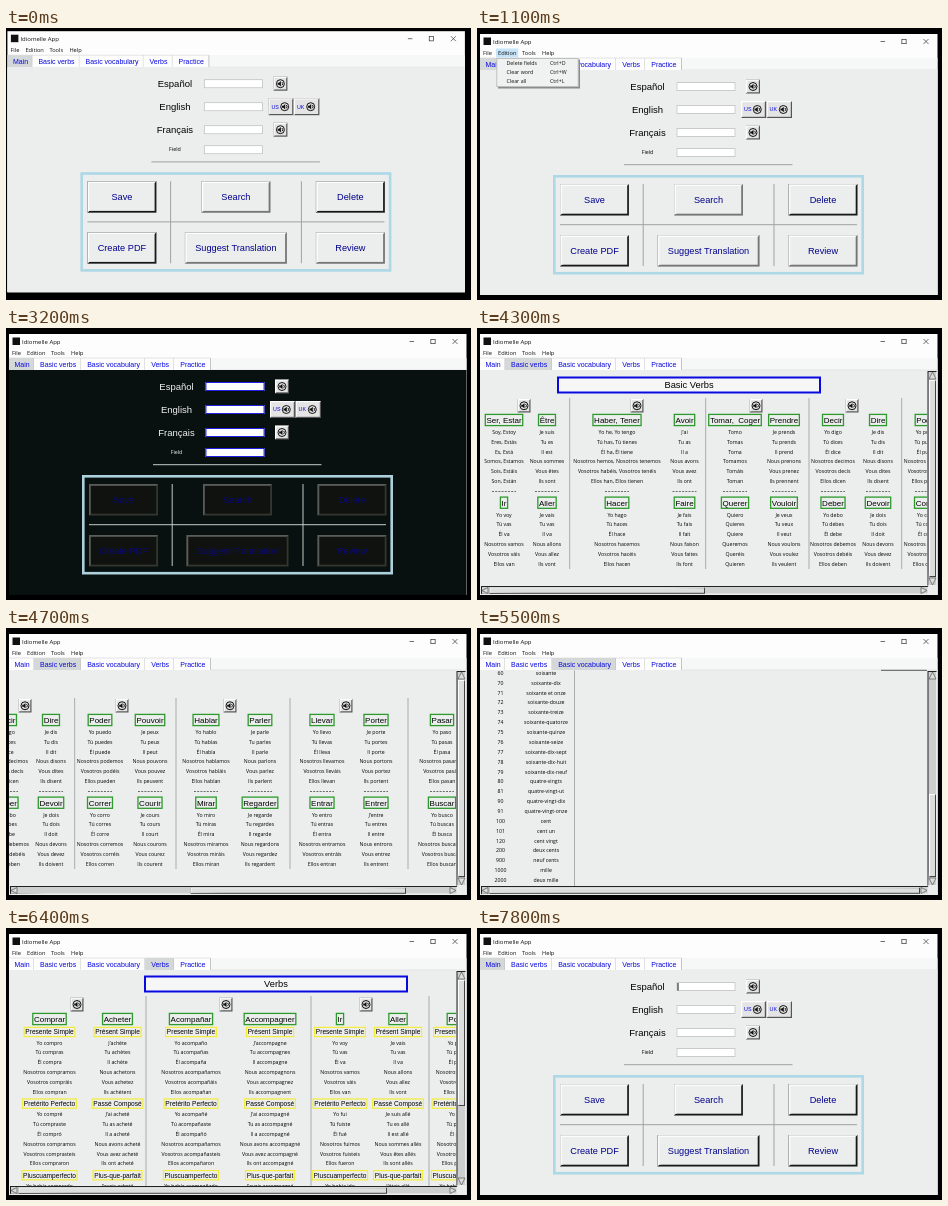
These frames come from a looping animation (465x272 px, 8000 ms). An HTML page with a canvas:

```html
<!DOCTYPE html>
<html lang="en">
<head>
<meta charset="utf-8">
<title>Idiomelle App</title>
<style>
html, body { margin: 0; width: 100%; height: 100%; overflow: hidden; background: #000; }
canvas { display: block; width: 465px; height: 272px; }
</style>
</head>
<body>
<canvas id="stage"></canvas>
<script>
const LOOP = 8000, W = 465, H = 272;
const canvas = document.getElementById('stage');
const c = canvas.getContext('2d');
const dpr = window.devicePixelRatio || 1;
canvas.width = W * dpr;
canvas.height = H * dpr;

const ARIAL = '"Liberation Sans", Arial, sans-serif';
const UI = '"Open Sans", "Noto Sans", sans-serif';
const PAGE = '#eceeed', BLUE = '#0808e0', NAVY = '#00008b';
const clamp = v => Math.max(0, Math.min(1, v));

// ---- drawing helpers ----
function rect(x, y, w, h, color) { c.fillStyle = color; c.fillRect(x, y, w, h); }
function frame(x, y, w, h, color, d = 1) {
  c.strokeStyle = color; c.lineWidth = d;
  c.strokeRect(x + d / 2, y + d / 2, w - d, h - d);
}
function line(x1, y1, x2, y2, color, d = 1) {
  c.strokeStyle = color; c.lineWidth = d;
  c.beginPath(); c.moveTo(x1, y1); c.lineTo(x2, y2); c.stroke();
}
function poly(color, ...p) {
  c.fillStyle = color; c.beginPath();
  for (let i = 0; i < p.length; i += 2) c.lineTo(p[i], p[i + 1]);
  c.fill();
}
function text(s, x, y, size, color = '#000', align = 'center', font = ARIAL) {
  c.font = size + 'px ' + font;
  c.textAlign = align;
  c.fillStyle = color;
  c.fillText(s, x, y + size * 0.35);
}
function bevel(x, y, w, h, d, fill, hi, lo) {
  rect(x, y, w, h, lo);
  poly(hi, x, y, x + w, y, x + w - d, y + d, x + d, y + h - d, x, y + h);
  rect(x + d, y + d, w - 2 * d, h - 2 * d, fill);
}
function boxed(s, x, y, size, h, color, d) {
  c.font = size + 'px ' + ARIAL;
  const w = c.measureText(s).width + 3.6;
  frame(x - w / 2, y - h / 2, w, h, color, d);
  text(s, x, y, size);
}
function speaker(x, y) {
  c.strokeStyle = '#111'; c.lineWidth = 1;
  c.beginPath(); c.arc(x, y, 4, 0, 7); c.stroke();
  poly('#111', x - 2.8, y - 1, x - 1.4, y - 1, x + .5, y - 2.7, x + .5, y + 2.7, x - 1.4, y + 1, x - 2.8, y + 1);
  c.beginPath(); c.arc(x + .3, y, 2, -.9, .9); c.stroke();
}
function soundButton(x, y, w = 14, h = 14, label = '') {
  bevel(x, y, w, h, 1.2, '#e4e4e4', '#fff', '#555');
  speaker(x + w - (label ? 8.7 : w / 2), y + h / 2);
  if (label) text(label, x + 6.8, y + h / 2, 5.3, BLUE);
}
function heading(s, x, y) {
  rect(x, y, 264, 17, '#f5f6f5');
  frame(x, y, 264, 17, BLUE, 2);
  text(s, x + 132, y + 8.5, 9.3);
}

// ---- window ----
const tabs = [['Main', 3, 25], ['Basic verbs', 28, 47], ['Basic vocabulary', 75, 64], ['Verbs', 139, 29], ['Practice', 168, 36.5]];
const menus = [
  { name: 'File', x: 6, left: 4, w: 66, h: 33, key: 44, items: [['Open Sheet', 'Ctrl+E'], ['Open PDF', 'Ctrl+P'], null, ['Exit']] },
  { name: 'Edition', x: 21, left: 19.5, w: 82, h: 29, key: 73, items: [['Delete fields', 'Ctrl+D'], ['Clear word', 'Ctrl+W'], ['Clear all', 'Ctrl+L']] },
  { name: 'Tools', x: 45, left: 43, w: 87, h: 29, key: 102, items: [['Change theme', 'Ctrl+T'], ['Change voice', 'Ctrl+O'], ['Font size', 'Ctrl+F']] },
  { name: 'Help', x: 65, left: 63, w: 64, h: 20, key: 103, items: [['User guide', 'Ctrl+H'], ['About']] }
];

function chrome(tab, page, open) {
  rect(3, 6, 457.5, 261, '#fdfdfd');
  rect(204.5, 30, 256, 12, '#f6f7f7');
  rect(3, 42, 457.5, 225, page);
  rect(6.5, 9.5, 7.5, 7.5, '#111');
  text('Idiomelle App', 16, 13.5, 6, '#111', 'left', UI);
  line(403.5, 13.5, 408, 13.5, '#333', .7);
  frame(424.5, 11, 5, 5, '#333', .7);
  line(446.5, 11, 451.5, 16, '#333', .7);
  line(451.5, 11, 446.5, 16, '#333', .7);
  menus.forEach((m, i) => {
    if (i === open) rect(m.x - 2, 20.5, m.name.length * 2.6 + 4, 9, '#c5e4fa');
    text(m.name, m.x, 25, 5.7, '#111', 'left', UI);
  });
  tabs.forEach(([name, x, w], i) => {
    rect(x, 30, w, 12, i === tab ? '#d5d8d9' : '#fdfdfd');
    line(x + w, 30, x + w, 42, '#b4b8b8', .8);
    text(name, x + w / 2 + .6, 36.3, 7, BLUE);
  });
  line(3, 30, 204.5, 30, '#d0d2d2', .6);
  line(204.5, 42, 460.5, 42, '#d8dada', .6);
}

function dropDown({ left, w, h, key, items }) {
  rect(left + 1.5, 31.5, w, h, '#8a8c8c');
  rect(left, 30, w, h, '#f0f1f1');
  frame(left, 30, w, h, '#aaa', .7);
  let y = 35.5;
  for (const item of items) {
    if (!item) {
      line(left + 3, y - 2.8, left + w - 3, y - 2.8, '#aaa', .6);
      y += 3.5;
      continue;
    }
    text(item[0], left + 10, y, 5.3, '#111', 'left', UI);
    if (item[1]) text(item[1], key, y, 5.3, '#111', 'left', UI);
    y += 9;
  }
}

// h0..h1 and v0..v1 are the ends of the two thumbs
function scrollBars(h0, h1, v0, v1) {
  rect(450.5, 42, 10, 225, PAGE);
  rect(3, 258, 457.5, 9, PAGE);
  bevel(450.5, 43, 9.5, 215, 1, '#cdcfce', '#222', '#eee');
  bevel(4, 258, 447.5, 8.5, 1, '#cdcfce', '#222', '#eee');
  bevel(452, v0, 7, v1 - v0, .9, '#dcdedd', '#fff', '#333');
  bevel(h0, 259.3, h1 - h0, 6.4, .9, '#dcdedd', '#fff', '#333');
  const arrow = (...p) => {
    poly('#dcdedd', ...p);
    c.closePath(); c.strokeStyle = '#555'; c.lineWidth = .7; c.stroke();
  };
  arrow(455.5, 44, 459, 51, 452, 51);
  arrow(452, 250, 459, 250, 455.5, 257);
  arrow(5, 262.5, 11, 259.5, 11, 265.5);
  arrow(450, 262.5, 444, 259.5, 444, 265.5);
}

function clipPage(draw, dx = 0, dy = 0) {
  c.save();
  c.beginPath(); c.rect(3, 42.5, 447.5, 215.5); c.clip();
  c.translate(-dx, -dy);
  draw();
  c.restore();
}

// ---- main page ----
const themes = {
  light: { page: PAGE, ink: '#000', rule: '#a0a2a2', edge: '#add8e6', entry: '#c4c6c6', face: '#eceeed', hi: '#fff', label: NAVY },
  mild: { page: '#e2efe0', ink: '#000', rule: '#a0a2a2', edge: '#b9dfba', entry: BLUE, face: '#e2efe0', hi: '#fff', label: NAVY },
  dark: { page: '#08110f', ink: '#f2f2f2', rule: '#c4c8c6', edge: '#add0dc', entry: BLUE, face: '#10120f', hi: '#5a5c58', lo: '#34362f', label: '#0a0a78' }
};
const buttons = [
  ['Save', 83, 156, 69, 1], ['Search', 197, 156, 69], ['Delete', 311.5, 156, 69, 1],
  ['Create PDF', 83, 207, 69, 1], ['Suggest Translation', 180.5, 207, 102], ['Review', 311.5, 207, 69]
];

function mainPage(th, t) {
  rect(3, 42, 457.5, 225, th.page);
  text('Español', 170.5, 58.7, 9.5, th.ink);
  text('English', 170.5, 81.7, 9.5, th.ink);
  text('Français', 170.5, 104.7, 9.5, th.ink);
  text('Field', 170.5, 124.3, 5.3, th.ink, 'center', UI);
  for (const y of [54, 77, 100, 120]) {
    rect(199.5, y, 59, 9, '#fff');
    frame(199.5, y, 59, 9, th.entry, .9);
  }
  if (t >= 7700) line(201, 55, 201, 62.5, '#111', 1);
  soundButton(269, 51.5);
  soundButton(264, 73, 25, 17, 'US');
  soundButton(289.5, 73, 25.5, 17, 'UK');
  soundButton(269, 97.5);
  line(147, 136.7, 315.5, 136.7, th.rule);
  frame(76, 147, 311, 99.5, th.edge, 2.6);
  line(83, 196.7, 380, 196.7, th.rule);
  line(166.2, 156, 166.2, 238, th.rule);
  line(297, 156, 297, 238, th.rule);
  for (const [name, x, y, w, deep] of buttons) {
    const lo = th.lo || (deep || t >= 3500 ? '#151515' : '#777');
    bevel(x, y, w, 31.5, 1.8, th.face, th.hi, lo);
    if (!th.lo) frame(x, y, w, 31.5, 'rgba(120,120,120,.4)', .6);
    text(name, x + w / 2, y + 15.7, 9.2, th.label);
  }
}

// ---- verbs ----
const ES = ['Yo', 'Tú', 'Él', 'Nosotros', 'Vosotros', 'Ellos'];
const FR = ['Je', 'Tu', 'Il', 'Nous', 'Vous', 'Ils'];
function withPronoun(p, form) {
  if (/^[A-Z]/.test(form)) return form;
  return p === 'Je' && /^[aeiouéê]/.test(form) ? "J'" + form : p + ' ' + form;
}
const conjugate = (pronouns, forms) => forms.split(',').map((f, i) =>
  f.split('/').map(v => withPronoun(pronouns[i], v)).join(', '));
const endings = (stem, list) => list.split(',').map(e => stem + e).join(',');
const ar = s => endings(s, 'o,as,a,amos,áis,an');
const arPast = s => endings(s, 'é,aste,ó,amos,asteis,aron');
const er = s => endings(s, 'e,es,e,ons,ez,ent');
const perfect = p => 'ai,as,a,avons,avez,ont'.split(',').map(a => a + ' ' + p).join(',');
const regular = (es, fr) => [es + 'ar', ar(es.toLowerCase()), fr + 'er', er(fr.toLowerCase())];

// [Spanish x, French x, sound x, divider x, upper verb, lower verb]
const basics = [
  [27, 70, 47, 92.7,
    ['Ser, Estar', 'Soy/Estoy,Eres/Estás,Es/Está,Somos/Estamos,Sois/Estáis,Son/Están', 'Être', 'suis,es,est,sommes,êtes,sont'],
    ['Ir', 'voy,vas,va,vamos,váis,van', 'Aller', 'vais,vas,va,allons,allez,vont']],
  [140, 207.5, 160, 228.7,
    ['Haber, Tener', 'he/tengo,has/tienes,ha/tiene,hemos/tenemos,habéis/tenéis,han/tienen', 'Avoir', 'ai,as,a,avons,avez,ont'],
    ['Hacer', 'hago,haces,hace,hacemos,hacéis,hacen', 'Faire', 'fais,fais,fait,faison,faites,font']],
  [258, 307, 279, 332,
    ['Tomar,  Coger', 'Tomo,Tomas,Toma,Tomamos,Tomáis,Toman', 'Prendre', 'prends,prends,prend,prenons,prenez,prennent'],
    ['Querer', 'Quiero,Quieres,Quiere,Queremos,Queréis,Quieren', 'Vouloir', 'veux,veux,veut,voulons,voulez,veulent']],
  [356, 401, 375, 424.7,
    ['Decir', 'digo,dices,dice,decimos,decís,dicen', 'Dire', 'dis,dis,dit,disons,dites,disent'],
    ['Deber', 'debo,debes,debe,debemos,debéis,deben', 'Devoir', 'dois,dois,doit,devons,devez,doivent']],
  [450, 500, 472, 526,
    ['Poder', 'puedo,puedes,puede,podemos,podéis,pueden', 'Pouvoir', 'peux,peux,peut,pouvons,pouvez,peuvent'],
    ['Correr', 'corro,corres,corre,corremos,corréis,corren', 'Courir', 'cours,cours,court,courons,courez,courent']],
  [556, 610, 580, 640, regular('Habl', 'Parl'), regular('Mir', 'Regard')],
  [672, 726, 696, 758, regular('Llev', 'Port'), regular('Entr', 'Entr')],
  [792, 850, 816, 884, regular('Pas', 'Pass'), regular('Busc', 'Cherch')]
];

function rows(list, x, y) {
  list.forEach((s, i) => text(s, x, y + i * 9.85, 5.2, '#000', 'center', UI));
}
function basicVerbs() {
  heading('Basic Verbs', 80, 48.5);
  for (const [x1, x2, sound, edge, ...pair] of basics) {
    soundButton(sound - 6.5, 71, 13, 13.5);
    line(edge, 70, edge, 241, '#a2a4a4', .9);
    pair.forEach(([es, esForms, fr, frForms], k) => {
      const y = 92 + k * 82.7;
      boxed(es, x1, y, 8, 12.5, '#2e9a2e', 1.3);
      boxed(fr, x2, y, 8, 12.5, '#2e9a2e', 1.3);
      rows(conjugate(ES, esForms), x1, y + 12.1);
      rows(conjugate(FR, frForms), x2, y + 12.1);
    });
    c.setLineDash([2, 1.2]);
    for (const x of [x1, x2]) line(x - 12, 163.5, x + 12, 163.5, '#333', .7);
    c.setLineDash([]);
  }
}

const tenses = [['Presente Simple', 'Présent Simple'], ['Pretérito Perfecto', 'Passé Composé'], ['Pluscuamperfecto', 'Plus-que-parfait']];
const esPluperfect = p => 'había,habías,había,habíamos,habíais,habían'.split(',').map(a => a + ' ' + p).join(',');
const fullVerbs = [
  [43.5, 111.5, 71, 140, 'Comprar', 'Acheter',
    [ar('compr'), arPast('compr'), esPluperfect('comprado')],
    ['achète,achètes,achète,achetons,achetez,achètent', perfect('acheté'), 'avais acheté']],
  [185, 264, 220, 305, 'Acompañar', 'Accompagner',
    [ar('acompañ'), arPast('acompañ'), esPluperfect('acompañado')],
    [er('accompagn'), perfect('accompagné'), 'avais accompagné']],
  [334, 392, 360, 423, 'Ir', 'Aller',
    ['voy,vas,va,vamos,váis,van', 'fui,fuiste,fué,fuimos,fuisteis,fueron', esPluperfect('ido')],
    ['vais,vas,va,allons,allez,vont', 'suis allé,es allé,est allé,sommes allés,êtes allés,sont allés', 'étais allé']],
  [453, 520, 490, 560, 'Poder', 'Pouvoir',
    ['puedo,puedes,puede,podemos,podéis,pueden', 'pude,pudiste,pudo,pudimos,pudisteis,pudieron', esPluperfect('podido')],
    ['peux,peux,peut,pouvons,pouvez,peuvent', perfect('pu'), 'avais pu']]
];
function verbsPage() {
  heading('Verbs', 138, 47.5);
  for (const [x1, x2, sound, edge, es, fr, esForms, frForms] of fullVerbs) {
    soundButton(sound - 6.5, 69.5, 13, 14);
    line(edge, 68, edge, 258, '#a2a4a4', .9);
    boxed(es, x1, 91, 8, 12.5, '#2e9a2e', 1.3);
    boxed(fr, x2, 91, 8, 12.5, '#2e9a2e', 1.3);
    tenses.forEach(([a, b], k) => {
      const y = 104 + k * 71.6;
      boxed(a, x1, y, 6.6, 10.5, '#f4ec38', 1.2);
      boxed(b, x2, y, 6.6, 10.5, '#f4ec38', 1.2);
      rows(conjugate(ES, esForms[k]), x1, y + 10.8);
      rows(conjugate(FR, frForms[k]), x2, y + 10.8);
    });
  }
}

// ---- vocabulary ----
const numbers = [];
'un deux trois quatre cinq six sept huit neuf dix onze douze treize quatorze quinze seize dix-sept dix-huit dix-neuf vingt'
  .split(' ').forEach((w, i) => numbers.push([i + 1, w]));
numbers.push([30, 'trente'], [40, 'quarante'], [50, 'cinquante'], [60, 'soixante']);
'dix, et onze,douze,treize,quatorze,quinze,seize,dix-sept,dix-huit,dix-neuf'.split(',')
  .forEach((w, i) => numbers.push([70 + i, 'soixante' + (w[0] === ' ' ? w : '-' + w)]));
numbers.push([80, 'quatre-vingts'], [81, 'quatre-vingt-ut'], [90, 'quatre-vingt-dix'], [91, 'quatre-vingt-onze'],
  [100, 'cent'], [101, 'cent un'], [120, 'cent vingt'], [200, 'deux cents'], [900, 'neuf cents'], [1000, 'mille'], [2000, 'deux mille']);
const VOCAB_END = 292;

function vocabulary() {
  heading('Basic Vocabulary', 80, 48.5);
  line(97.5, 70, 97.5, 560, '#a2a4a4', .9);
  numbers.forEach(([n, word], i) => {
    const y = 110 + i * 9.87;
    text(n, 23.5, y, 5.2, '#000', 'center', UI);
    text(word, 69, y, 5.2, '#000', 'center', UI);
  });
}

// ---- timeline ----
const tabTimes = [[7300, 0], [6800, 4], [6300, 3], [4900, 2], [4300, 1], [0, 0]];
const menuTimes = [[2300, -1], [2100, 0], [1900, 1], [1700, 2], [1500, 3], [1300, 2], [1100, 1], [700, 0], [0, -1]];
const at = (list, t) => list.find(([start]) => t >= start)[1];

function draw(t) {
  t = Math.floor(t / 100) * 100;
  const tab = at(tabTimes, t), open = at(menuTimes, t);
  const shift = 1 - clamp(t / 200);
  c.setTransform(dpr, 0, 0, dpr, 0, 0);
  rect(0, 0, W, H, '#000');
  c.translate(-1.6 * shift, -2.8 * shift);
  chrome(tab, PAGE, open);

  if (tab === 0) {
    const dark = t >= 3200 && t < 3500;
    mainPage(dark ? themes.dark : themes.light, t);
    if (t >= 2700 && t < 3200) {
      c.globalAlpha = clamp((t - 2600) / 300);
      mainPage(themes.mild, t);
      c.globalAlpha = 1;
    }
  } else if (tab === 1) {
    const p = clamp((t - 4300) / 500);
    clipPage(basicVerbs, p * 445);
    scrollBars(12.5 + p * 215, 228 + p * 215, 52, 249);
  } else if (tab === 2) {
    const p = t < 5700 ? clamp((t - 5100) / 400) : 1 - clamp((t - 5600) / 500);
    clipPage(vocabulary, 0, p * VOCAB_END);
    if (p === 1) line(404, 42.3, 450, 42.3, '#333', .8);
    scrollBars(12.5, 443, 52 + p * 114, 135 + p * 114);
  } else if (tab === 3) {
    clipPage(verbsPage);
    scrollBars(12.5, 381, 52, 178);
  } else {
    heading('Practice', 100, 48.5);
  }
  if (open >= 0) dropDown(menus[open]);
}

const start = performance.now();
function tick() {
  draw((performance.now() - start) % LOOP);
  requestAnimationFrame(tick);
}
tick();
</script>
</body>
</html>
```
